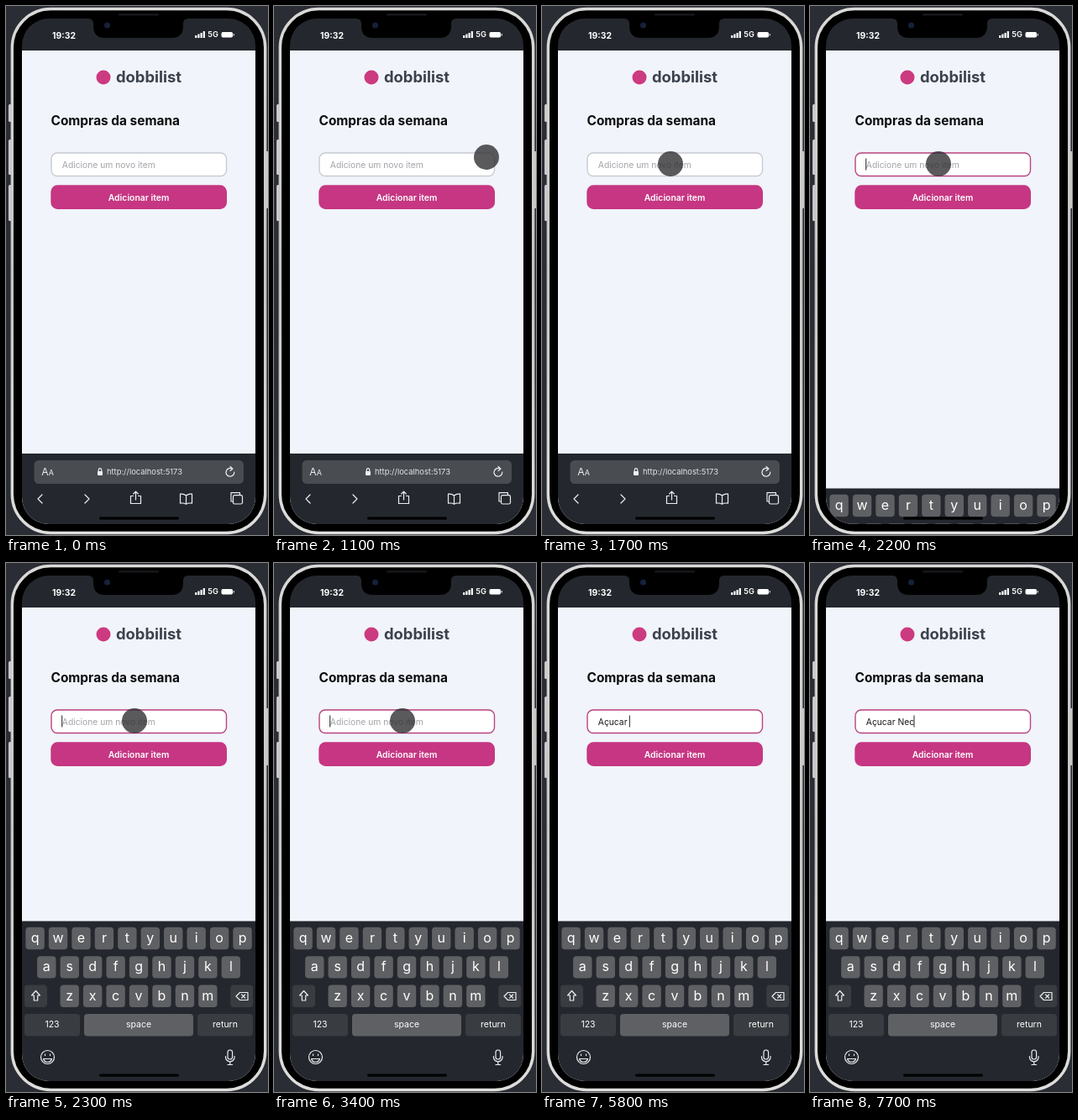
Animation of 312 by 630 pixels, one loop 8000 ms. Source, as an HTML page:

```html
<!DOCTYPE html>
<html lang="pt">
<head>
<meta charset="utf-8">
<style>
  html, body { margin: 0; width: 100%; height: 100%; overflow: hidden; background: #2a2d34; }
  svg { display: block; width: 312px; height: 630px; font-family: Inter, sans-serif; }
  text { white-space: pre; }
  .mid { text-anchor: middle; }
  .icon { fill: none; stroke: #eceef1; stroke-width: 1.2; stroke-linecap: round; stroke-linejoin: round; }
</style>
</head>
<body>
<svg viewBox="0 0 312 630">
  <defs>
    <clipPath id="screen"><rect x="19" y="15" width="278" height="602" rx="32"/></clipPath>
    <linearGradient id="metal" x2="0" y2="1">
      <stop stop-color="#d9d9d8"/><stop offset=".5" stop-color="#c3c3c3"/><stop offset="1" stop-color="#dededc"/>
    </linearGradient>
  </defs>

  <g fill="#c9c9c9">
    <rect x="3" y="117" width="4" height="21" rx="1.5"/>
    <rect x="3" y="159" width="4" height="42" rx="1.5"/>
    <rect x="3" y="213" width="4" height="43" rx="1.5"/>
    <rect x="309" y="173" width="4" height="68" rx="1.5"/>
  </g>
  <rect x="7.3" y="3.5" width="301.4" height="624" rx="46" stroke="url(#metal)" stroke-width="3.4"/>

  <g clip-path="url(#screen)">
    <rect x="19" y="15" width="278" height="602" fill="#24282e"/>
    <rect x="19" y="53" width="278" height="564" fill="#f1f4fa"/>

    <circle cx="116" cy="85" r="8.5" fill="#cc3a80"/>
    <text x="131" y="91" font-size="18.4" font-weight="700" fill="#3b424d">dobbilist</text>
    <text x="53.5" y="141.5" font-size="15.4" font-weight="700" fill="#0b0c0f">Compras da semana</text>

    <rect id="field" x="54" y="175" width="208.5" height="27.5" rx="7" fill="#fff" stroke-width="1.4"/>
    <text id="hint" x="66.8" y="192.6" font-size="10.3" fill="#a2a4a9">Adicione um novo item</text>
    <text id="typed" x="66.8" y="192.6" font-size="10.3" fill="#17181b"></text>
    <rect id="caret" y="181.5" width="1" height="14" fill="#222"/>

    <rect x="53.3" y="213.3" width="209.7" height="28.6" rx="8" fill="#c63682"/>
    <text class="mid" x="158" y="231.7" font-size="10.4" font-weight="600" fill="#fff">Adicionar item</text>

    <g id="browser">
      <rect x="19" y="533" width="278" height="84" fill="#24282e"/>
      <rect x="33.5" y="541" width="249.5" height="28" rx="5.5" fill="#494c51"/>
      <text x="42.3" y="559" font-size="12.2" fill="#eceef1">A<tspan font-size="9">A</tspan></text>
      <rect x="109" y="554" width="6" height="5" rx=".8" fill="#eceef1"/>
      <path class="icon" d="M110.3 554v-1.6a1.7 1.7 0 0 1 3.4 0v1.6"/>
      <text x="120" y="558.3" font-size="9.4" fill="#e4e6e9">http://localhost:5173</text>
      <g class="icon">
        <path d="M269.8 551.4a4.9 4.9 0 1 0 2 3.8M267 548.3l2.9 2.9-2.9 2.3"/>
        <path d="M43 582l-5 5 5 5M94 582l5 5-5 5"/>
        <path d="M151.5 583.5h-3v9h12v-9h-3M154.500 588v-9.500M151.700 581l2.800-2.800 2.800 2.800"/>
        <path d="M214.500 583q-3-2.500-7-1.800v11q4-.7 7 1 3-1.700 7-1v-11q-4-.7-7 1.800v10.200"/>
        <rect x="270.500" y="582.700" width="11" height="10.300" rx="1.800"/>
        <path d="M270 590h-2v-10.300h10.500v2.500"/>
      </g>
    </g>

    <g id="keyboard">
      <rect x="19" y="426.500" width="278" height="191" fill="#24282e"/>
      <g id="keys" fill="#fff"></g>
      <path d="M35.500 509.500l5 5.500h-2.800v6h-4.400v-6h-2.800z" class="icon"/>
      <g class="icon">
        <path d="M278.500 511.500h9.500v9h-9.500l-4.500-4.500zM280.700 514l4 4M284.700 514l-4 4"/>
        <circle cx="49.500" cy="588.500" r="8"/>
        <path d="M44.500 590.500a5.200 5.200 0 0 0 10 0zM46.500 585v1.400M52.500 585v1.400"/>
        <rect x="264" y="580" width="5.600" height="11" rx="2.800"/>
        <path d="M261.500 587.500v1a5.300 5.300 0 0 0 10.600 0v-1M266.800 594v3.500M264 597.500h5.600"/>
      </g>
    </g>

    <rect x="111" y="608.500" width="95" height="3.200" rx="1.600"/>

    <path d="M98 15q6 0 6 6v3q0 14 14 14h79q14 0 14-14v-3q0-6 6-6z"/>
    <circle cx="120.500" cy="23" r="3.500" fill="#14213a"/>
    <text x="55" y="38.700" font-size="10.400" font-weight="700" fill="#fff">19:32</text>
    <text x="240.300" y="37.400" font-size="9.200" font-weight="600" fill="#fff">5G</text>
    <path d="M226.200 38v-3M229.400 38v-4.500M232.600 38v-6M235.800 38v-8" stroke="#fff" stroke-width="2.200"/>
    <rect x="256.500" y="31" width="13.500" height="6.500" rx="1.800" fill="#fff"/>
    <path d="M271.200 33v2.500" stroke="#fff"/>
  </g>
  <rect x="134" y="9" width="48" height="2.500" rx="1.200" fill="#17181b"/>
  <circle id="touch" r="15" fill="#2c2c2e" fill-opacity=".78"/>
</svg>

<script>
const $ = id => document.getElementById(id);
const LOOP = 8000, STEP = 100;

function addKey(label, x, y, width, size, fill = '#5e6063') {
  $('keys').innerHTML +=
    `<rect x="${x - width / 2}" y="${y - 13.2}" width="${width}" height="26.4" rx="4" fill="${fill}"/>
     <text class="mid" x="${x}" y="${y + size * 0.3}" font-size="${size}">${label}</text>`;
}

[['qwertyuiop', 34.6], ['asdfghjkl', 48.3], ['zxcvbnm', 75.7]].forEach(([letters, left], row) =>
  [...letters].forEach((letter, i) => addKey(letter, left + i * 27.44, 447 + row * 34.4, 22.4, 16)));
const DARK = '#393c40';
addKey('', 35.5, 515.8, 27, 10, DARK);
addKey('', 280.7, 515.8, 27, 10, DARK);
addKey('123', 55, 550.2, 66, 10.5, DARK);
addKey('space', 158, 550.2, 130, 10.5);
addKey('return', 261, 550.2, 66, 10.5, DARK);

const TEXT = 'Açucar Nec';
const strokes = [3600, 4000, 4400, 4600, 4800, 5100, 5800, 6900, 7500, 7700];
const caretOff = [[2700, 3400], [5600, 5800], [6400, 6900]];
const within = (t, from, to) => t >= from && t < to;

function draw(t) {
  const focused = t >= 2200;
  const count = strokes.filter(s => t >= s).length;
  const show = (id, on) => $(id).setAttribute('visibility', on ? 'visible' : 'hidden');

  $('typed').textContent = TEXT.slice(0, count);
  $('caret').setAttribute('x', 66.2 + (count ? $('typed').getComputedTextLength() : 0));
  $('field').setAttribute('stroke', focused ? '#b9427f' : '#c8cbd1');
  show('hint', !count);
  show('caret', focused && !caretOff.some(([from, to]) => within(t, from, to)));
  show('browser', !focused);
  show('keyboard', focused);
  $('keyboard').setAttribute('transform', `translate(0 ${t < 2300 ? 148 : 0})`);

  const p = Math.min(1, Math.max(0, (t - 1100) / 600));
  const eased = p * p * (3 - 2 * p);
  $('touch').setAttribute('cx', 253 - 100 * eased);
  $('touch').setAttribute('cy', 180 + 8 * eased);
  show('touch', within(t, 1100, 4400));
}

const start = performance.now();
function tick() {
  const t = (performance.now() - start) % LOOP;
  draw(Math.floor(t / STEP) * STEP);
  requestAnimationFrame(tick);
}
tick();
</script>
</body>
</html>
```
